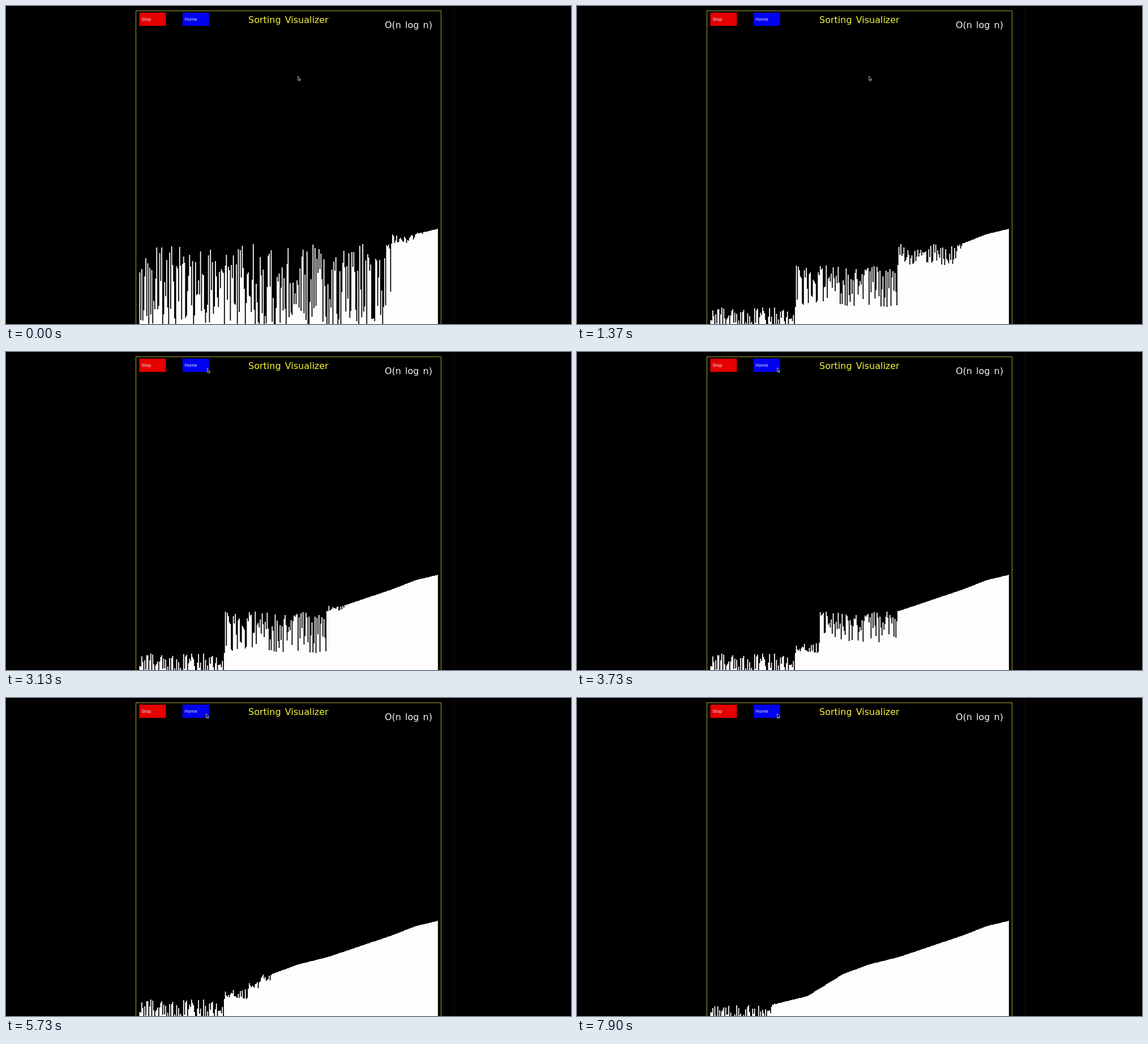
Animation of 998 by 561 pixels, one loop 8000 ms. Source, as an HTML page with a canvas:

```html
<!DOCTYPE html>
<html lang="en">
<head>
<meta charset="utf-8">
<title>Sorting Visualizer</title>
<style>
  html, body { margin: 0; width: 998px; height: 561px; overflow: hidden; background: #000; }
  body { position: relative; font-family: "DejaVu Sans", Verdana, sans-serif; }
  canvas, svg, div { position: absolute; }
  canvas, svg { left: 0; top: 0; }
  .edge { left: 791px; top: 0; width: 1px; height: 561px; background: #101010; }
  .frame { left: 229px; top: 8px; width: 538px; height: 600px; border: 1px solid #a4a438; }
  .label { white-space: pre; line-height: 20px; font-size: 16px; word-spacing: 2px; }
  .title { left: 428px; top: 15px; color: #f4f43c; }
  .order { left: 669px; top: 24px; color: #f2f2f2; }
  .button { top: 12px; line-height: 23px; font-size: 7.5px; color: #eee; }
  .stop { left: 239.5px; }
  .home { left: 315.5px; }
</style>
</head>
<body>
<div class="edge"></div>
<div class="frame"></div>
<canvas id="stage" width="998" height="561"></canvas>
<div class="button stop">Stop</div>
<div class="button home">Home</div>
<div class="label title">Sorting Visualizer</div>
<div class="label order">O(n log n)</div>
<svg id="cursor" width="8" height="12" viewBox="0 0 8 12">
  <path d="M.7 .8V8.2L2.3 6.8 3.4 9.4 4.6 8.9 3.5 6.4H5.6Z" fill="#000" stroke="#d8d8d8" stroke-width=".8"/>
</svg>
<script>
const LOOP = 8000, COUNT = 300, LEFT = 235.5, STEP = 1.758, BOTTOM = 561;
const TICK = 36, FIRST = 11; // one pivot settles per tick; the loop opens mid-sort

// Height profile of the sorted bars: [rank, top].
const profile = [[0, 572], [62, 541], [97, 526], [133, 487], [159, 470],
  [189, 457], [253, 419], [278, 402], [300, 393]];
// Pivots that shape the visible plateaus; the others are random.
const pivots = [253, 277, 293, 85, 188, 206, 109, 148, 159, 133, 121, 97, 62];
const cursorPath = [[1900, 515, 123], [2500, 355, 28], [3300, 355, 28], [3700, 353, 27]];

let seed = 41;
const random = () => (seed = (seed * 16807) % 2147483647) / 2147483647;
const between = (lo, hi) => lo + Math.floor(random() * (hi - lo));

function along(points, x, column = 1) {
  if (x <= points[0][0]) return points[0][column];
  for (let i = 1; i < points.length; i++) {
    const a = points[i - 1], b = points[i];
    if (x <= b[0]) return a[column] + (b[column] - a[column]) * (x - a[0]) / (b[0] - a[0]);
  }
  return points[points.length - 1][column];
}

const ranks = Array.from({ length: COUNT }, (_, i) => i);
const swap = (i, j) => { [ranks[i], ranks[j]] = [ranks[j], ranks[i]]; };
for (let i = COUNT - 1; i > 0; i--) swap(i, between(0, i + 1));

// Quicksort, right side first, keeping the state after each partition.
const states = [ranks.slice()];
function sort(lo, hi) {
  if (lo >= hi) return;
  const pivot = pivots.find(p => p >= lo && p < hi) ?? between(lo, hi);
  swap(ranks.indexOf(pivot), hi - 1);
  let i = lo;
  for (let j = lo; j < hi - 1; j++) if (ranks[j] < pivot) swap(i++, j);
  swap(i, hi - 1);
  states.push(ranks.slice());
  sort(pivot + 1, hi);
  sort(lo, pivot);
}
sort(0, COUNT);

const cursor = document.getElementById("cursor");
const pen = document.getElementById("stage").getContext("2d");

function button(x, color) {
  pen.fillStyle = color;
  pen.fillRect(x, 11.7, 46.9, 23.4);
}

function bars(state) {
  pen.fillStyle = "#fdfdfd";
  pen.beginPath();
  pen.moveTo(LEFT, BOTTOM);
  state.forEach((rank, i) => {
    const y = Math.min(BOTTOM, Math.round(along(profile, rank)));
    pen.lineTo(LEFT + i * STEP, y);
    pen.lineTo(LEFT + (i + 1) * STEP, y);
  });
  pen.lineTo(LEFT + COUNT * STEP, BOTTOM);
  pen.fill();
}

function draw(time) {
  pen.clearRect(0, 0, 998, 561);
  button(LEFT, "#e60000");
  button(LEFT + 76.2, "#0000f2");
  bars(states[FIRST + Math.floor(time / TICK)]);
  const x = along(cursorPath, time), y = along(cursorPath, time, 2);
  cursor.style.transform = `translate(${x}px, ${y}px)`;
}

const begin = performance.now();
function tick() {
  draw((performance.now() - begin) % LOOP);
  requestAnimationFrame(tick);
}
tick();
</script>
</body>
</html>
```
